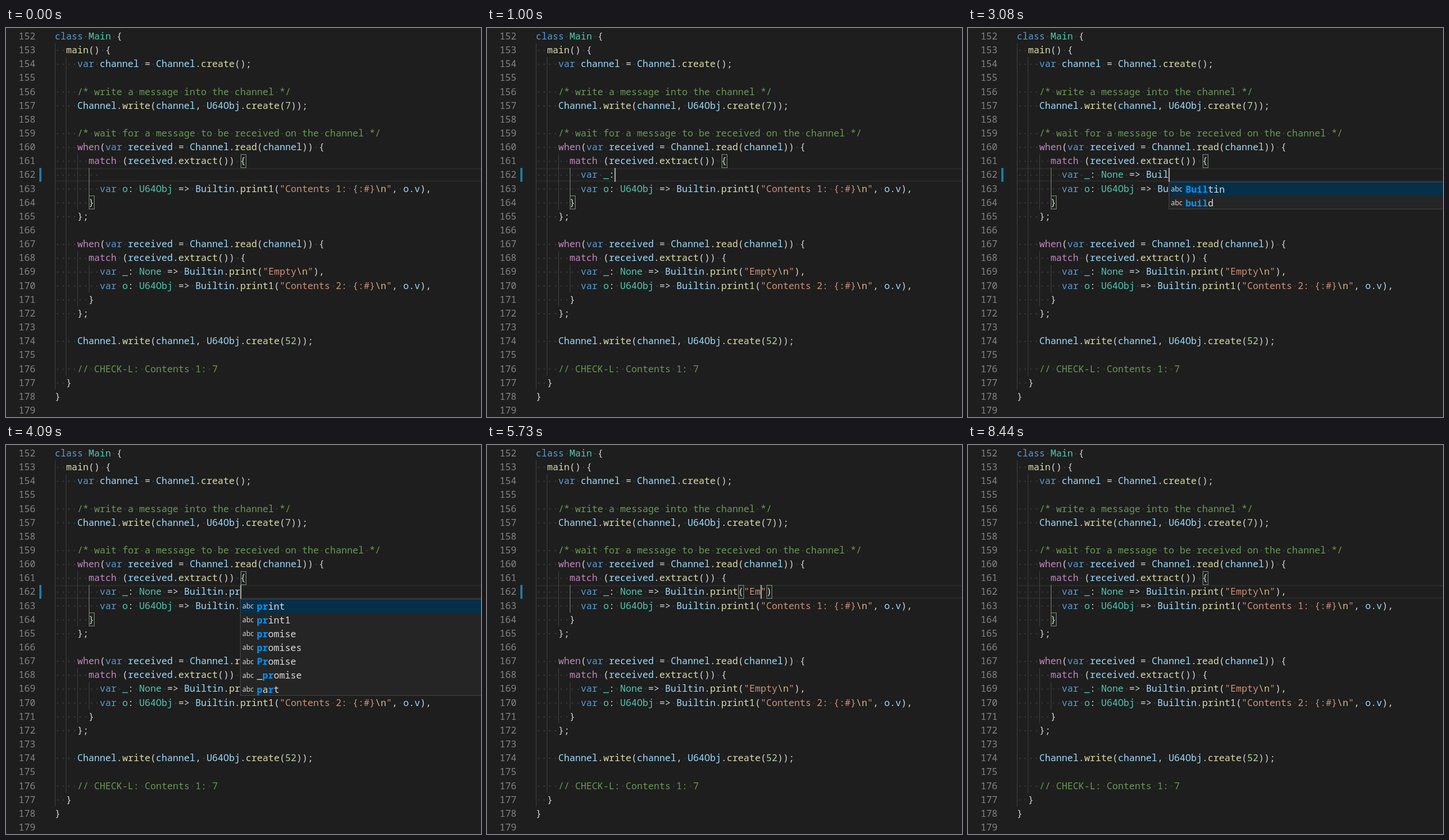
Recreate the animation shown at these times as an HTML page with a canvas. Size 826 px wide and 678 px high, loop 8.73 s.

```html
<!DOCTYPE html>
<html lang="en">
<head>
<meta charset="utf-8">
<title>Code completion</title>
<style>
html, body { margin: 0; width: 100%; height: 100%; overflow: hidden; background: #1e1e1e; }
canvas { display: block; }
</style>
</head>
<body>
<canvas id="stage" width="826" height="678"></canvas>
<script>
const g = document.getElementById('stage').getContext('2d', { alpha: false });
const W = 826, H = 678, LOOP = 8730;
const X0 = 84.9, ADV = 9.77, Y0 = 2.4, ROW = 24.15, POPUP_W = 546;
const FIRST = 152, EDIT = 10;
const mono = weight => weight + ' 16.28px "Noto Sans Mono", "DejaVu Sans Mono", monospace';
const FONT = mono(500), BOLD = mono(700);
const ICON = '500 12px "Open Sans", "Noto Sans", sans-serif';

const C = {
  bg: '#1e1e1e', num: '#858585', text: '#d4d4d4', blue: '#569cd6', type: '#4ec9b0',
  fn: '#dcdcaa', name: '#9cdcfe', flow: '#c586c0', digit: '#b5cea8', str: '#ce9178',
  esc: '#d7ba7d', note: '#6a9955', guide: '#404040', active: '#858580', dot: '#434343'
};

const LINES = String.raw`class Main {
  main() {
    var channel = Channel.create();

    /* write a message into the channel */
    Channel.write(channel, U64Obj.create(7));

    /* wait for a message to be received on the channel */
    when(var received = Channel.read(channel)) {
      match (received.extract()) {

        var o: U64Obj => Builtin.print1("Contents 1: {:#}\n", o.v),
      }
    };

    when(var received = Channel.read(channel)) {
      match (received.extract()) {
        var _: None => Builtin.print("Empty\n"),
        var o: U64Obj => Builtin.print1("Contents 2: {:#}\n", o.v),
      }
    };

    Channel.write(channel, U64Obj.create(52));

    // CHECK-L: Contents 1: 7
  }
}
`.split('\n');

// Typed text: [time, characters added before the caret, text after the caret]
const KEYS = [
  [140, 'va'], [270, 'r'], [420, ' '], [690, '_'],
  [1000, ':'], [1070, ' '], [1250, 'N'], [1410, 'o'], [1560, 'n'], [1700, 'e'],
  [1860, ' '], [2010, '='], [2240, '>'], [2320, ' '],
  [2620, 'B'], [2780, 'u'], [2930, 'i'], [3080, 'l'], [3160, 't'], [3320, 'in'], [3540, '.'],
  [3770, 'p'], [4090, 'r'], [4170, 'i'], [4250, 'n'], [4550, 't'],
  [4950, '(', ')'], [5330, '"', '")'], [5530, 'E', '")'], [5730, 'm', '")'],
  [5800, 'p', '")'], [5920, 't', '")'], [6040, 'y', '")'],
  [6500, '\\', '")'], [6720, 'n', '")'], [6950, '"', ')'], [7800, ')'], [7930, ',']
];
const PARENS = [5010, 7980], BLEED = [6570, 6790], SAVED = 8250;
const BLINKS = [[0, 140], [7430, 7800], [8440, LOOP]];

const WORDS = {
  v: ['var', 'value'],
  _: ['_', '_none', '_promise', '_value', '_read', '_write', '_next', '_size'],
  n: ['None', '_none', 'new', 'next', 'name', 'null', 'num', 'node'],
  b: ['Builtin', 'build', 'buffer', 'Bool', 'block', 'base', 'bytes'],
  p: ['print', 'print1', 'promise', 'promises', 'Promise', '_promise', 'part', 'pop', 'put']
};

const colX = c => X0 + c * ADV;
const rowY = r => Y0 + r * ROW;
const within = (t, [a, b]) => t >= a && t < b;

function box(x, y, w, h, color) {
  g.fillStyle = color;
  g.fillRect(x, y, w, h);
}

function frame(x, y, w, h, color) {
  g.strokeStyle = color;
  g.lineWidth = 1;
  g.strokeRect(x + .5, y + .5, w - 1, h - 1);
}

function write(s, x, y, color, font = FONT) {
  g.font = font;
  g.fillStyle = color;
  g.fillText(s, x, y);
}

function typed(t) {
  let before = '', after = '';
  for (const [at, add, rest = ''] of KEYS) {
    if (at > t) break;
    before += add;
    after = rest;
  }
  return { before, after };
}

function tint(word, before, next) {
  if (/^\/[*\/]/.test(word)) return C.note;
  if (/^(class|var)$/.test(word)) return C.blue;
  if (/^(when|match)$/.test(word)) return C.flow;
  if (/^\d/.test(word)) return C.digit;
  if (!/^\w/.test(word)) return C.text;
  if (next === '(') return C.fn;
  return next === ':' || /(:\s*|class )$/.test(before) ? C.type : C.name;
}

const CODE = /\/\*.*?\*\/|\/\/.*|"|[A-Za-z_]\w*|\d+|\S/g;
const QUOTED = /\\.?|"|[^\\"]+/g;

// Draws one line; returns whether a string is still open at its end.
function drawCode(line, row, open) {
  let i = 0;
  while (i < line.length) {
    const re = open ? QUOTED : CODE;
    re.lastIndex = i;
    const m = re.exec(line);
    if (!m) break;
    i = re.lastIndex;
    const s = m[0];
    let color = open ? C.str : tint(s, line.slice(0, m.index), line[i]);
    if (s === '"') { open = !open; color = C.str; }
    else if (open && s[0] === '\\') color = C.esc;
    for (const part of s.matchAll(/\S+/g))
      write(part[0], colX(m.index + part.index), rowY(row) + 17.5, color);
  }
  for (let c = 0; c < line.length; c++)
    if (line[c] === ' ') box(colX(c) + 4, rowY(row) + 11.6, 1.9, 1.9, C.dot);
  return open;
}

function guide(col, from, to, color = C.guide) {
  box(Math.round(colX(col)), rowY(from), 1, (to - from + 1) * ROW, color);
}

function bracket(col, row) {
  const x = Math.ceil(colX(col)), y = Math.round(rowY(row));
  box(x, y, 10, 24, 'rgba(0,100,0,.1)');
  frame(x, y, 10, 24, '#888888');
}

// Positions of the query letters in the word, or null when it does not match.
function match(word, query) {
  const low = word.toLowerCase(), hits = [];
  let at = -1;
  for (const ch of query.toLowerCase()) {
    at = low.indexOf(ch, at + 1);
    if (at < 0) return null;
    hits.push(at);
  }
  return hits;
}

function drawPopup(query, x) {
  const items = (WORDS[query[0].toLowerCase()] || [])
    .map(word => ({ word, hits: match(word, query) }))
    .filter(item => item.hits);
  if (!items.length) return;
  const y = Math.round(rowY(EDIT + 1)), h = Math.round(items.length * ROW);
  x = Math.round(x);
  box(x, y, POPUP_W, h, '#252526');
  box(x, y, POPUP_W, 25, '#062f4a');
  items.forEach(({ word, hits }, n) => {
    const base = y + n * ROW + 18.6;
    write('abc', x + 4, base - 1.6, '#e0e0e0', ICON);
    [...word].forEach((ch, c) => {
      const hit = hits.includes(c);
      write(ch, x + 29.2 + c * ADV, base, hit ? '#0097fb' : '#dcdcdc', hit ? BOLD : FONT);
    });
  });
  frame(x, y, POPUP_W, h, '#454545');
}

function draw(t) {
  const { before, after } = typed(t);
  const current = ' '.repeat(8) + before + after;
  const caret = colX(8 + before.length), top = rowY(EDIT);

  box(0, 0, W, H, C.bg);
  box(X0, top, W, 2.5, '#282828');
  box(X0, top + ROW - 2.5, W, 2.5, '#282828');

  guide(0, 1, 25);
  guide(2, 2, 24);
  for (const r of [9, 16]) {
    guide(4, r, r + 3);
    guide(6, r + 1, r + 2);
  }
  guide(6, 10, 11, C.active);

  if (within(t, PARENS)) {
    bracket(current.indexOf('('), EDIT);
    bracket(current.lastIndexOf(')'), EDIT);
  } else {
    bracket(33, 9);
    bracket(6, 12);
  }

  let open = false;
  LINES.forEach((line, r) => {
    write(String(FIRST + r), 22, rowY(r) + 17.5, C.num);
    if (r === EDIT + 1) open = within(t, BLEED);
    open = drawCode(r === EDIT ? current : line, r, open);
  });

  if (t < SAVED) box(58, top, 3.6, ROW, '#1b81a8');
  if (!BLINKS.some(b => within(t, b))) box(caret, top, 2, ROW, '#aeafad');

  const word = before.match(/[A-Za-z_]\w*$/);
  if (word && !before.includes('"')) drawPopup(word[0], caret);
}

const start = performance.now();
function tick(now) {
  draw(Math.max(0, now - start) % LOOP);
  requestAnimationFrame(tick);
}
draw(0);
requestAnimationFrame(tick);
</script>
</body>
</html>
```
